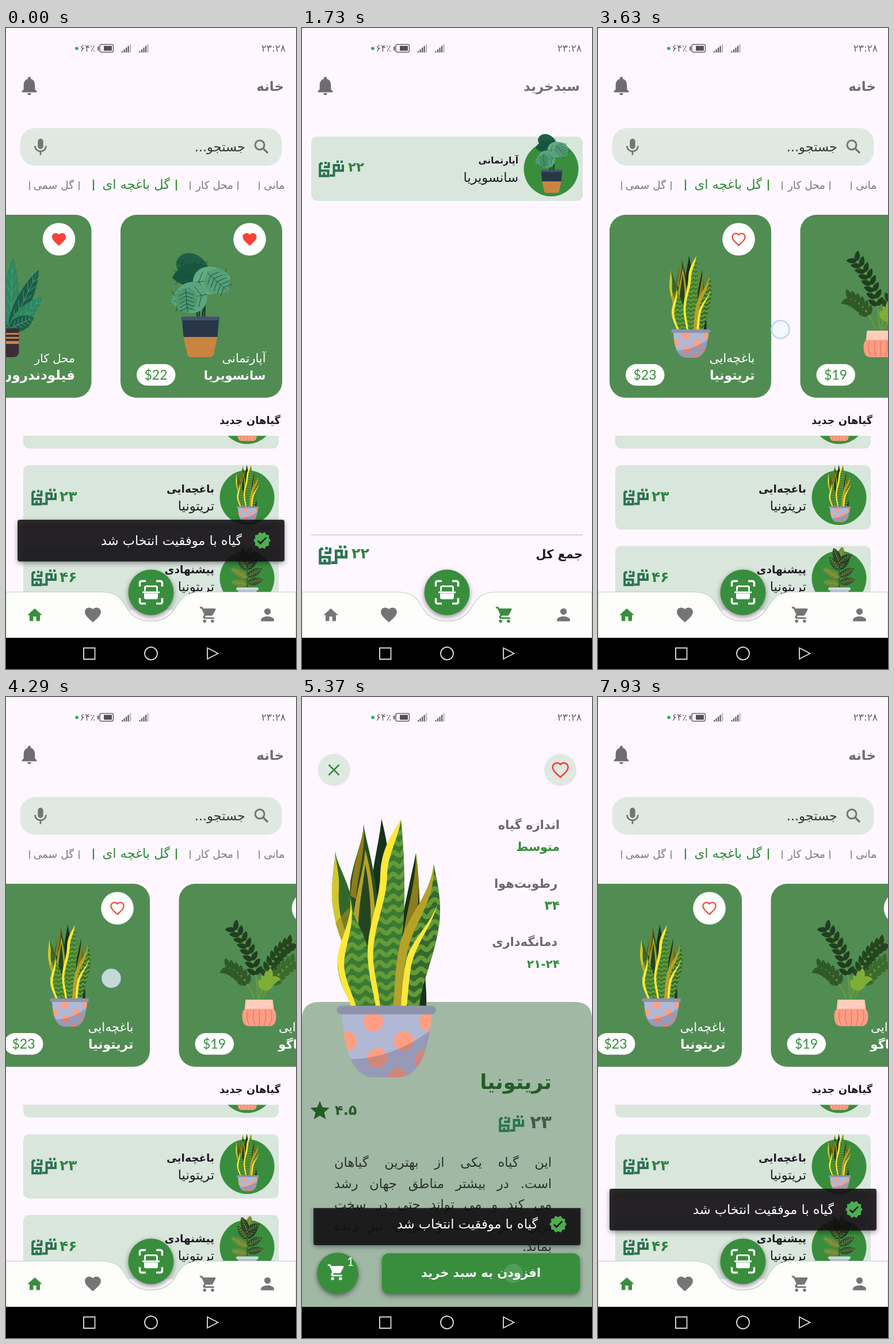
Recreate the animation shown at these times as an HTML page. Size 504 by 1112 pixels, loop 8000 ms.

```html
<!DOCTYPE html>
<html lang="fa">
<head>
<meta charset="utf-8">
<title>Plant shop</title>
<style>
  html, body { margin: 0; width: 100%; height: 100%; overflow: hidden; background: #fef7ff; }
  svg { display: block; }
  #stage { width: 504px; height: 1112px; }
  text, .para { font-family: "DejaVu Sans", "Noto Sans", sans-serif; }
  .latin { font-family: Lato, "Open Sans", sans-serif; }
  .soft { filter: drop-shadow(0 3px 4px rgba(0,0,0,.45)); }
  .para { direction: rtl; font-size: 22.5px; line-height: 36.6px; color: #2b322c; }
  .para div { text-align: justify; text-align-last: justify; white-space: nowrap; }
  .para div:last-child { text-align-last: right; }
</style>
</head>
<body>
<svg id="stage" viewBox="0 0 504 1112" xmlns="http://www.w3.org/2000/svg"></svg>
<script>
const LOOP = 8000;
const GREEN = '#388e3c', GREY = '#757575', RED = '#f44336', INK = '#1d1a22', BG = '#fef7ff';
const CARD_STEP = 331.5, REST = 764.5;
const GARDEN = 'باغچه&zwnj;ایی';

// ---------- drawing helpers ----------
const path = (d, fill, extra = '') => `<path d="${d}" fill="${fill}" ${extra}/>`;
const line = (d, color, w, extra = '') =>
  `<path d="${d}" fill="none" stroke="${color}" stroke-width="${w}" ${extra}/>`;
const rect = (x, y, w, h, r, fill, extra = '') =>
  `<rect x="${x}" y="${y}" width="${w}" height="${h}" rx="${r}" fill="${fill}" ${extra}/>`;
const disc = (x, y, r, fill, extra = '') => `<circle cx="${x}" cy="${y}" r="${r}" fill="${fill}" ${extra}/>`;
const at = (x, y, k, body) => `<g transform="translate(${x} ${y}) scale(${k})">${body}</g>`;

// Persian text hangs from its right edge, numbers from their left edge
const fa = (x, y, size, s, fill = INK, bold = false, anchor = 'start') =>
  `<text x="${x}" y="${y}" font-size="${size}" direction="rtl" text-anchor="${anchor}" fill="${fill}"
    font-weight="${bold ? 700 : 400}">${s}</text>`;
const num = (x, y, size, s, fill, bold = true, anchor = 'start') =>
  `<text x="${x}" y="${y}" font-size="${size}" direction="ltr" text-anchor="${anchor}" fill="${fill}"
    font-weight="${bold ? 700 : 400}">${s}</text>`;
const latin = (x, y, size, s, fill, extra = '') =>
  `<text class="latin" x="${x}" y="${y}" font-size="${size}" text-anchor="middle" fill="${fill}" ${extra}>${s}</text>`;

const HEART = 'M12 21.35l-1.45-1.32C5.4 15.36 2 12.28 2 8.5 2 5.42 4.42 3 7.5 3c1.74 0 3.41.81 4.5 2.09C13.09 3.81 14.76 3 16.5 3 19.58 3 22 5.42 22 8.5c0 3.78-3.4 6.86-8.55 11.54z';
const ICONS = {
  home: 'M10 20v-6h4v6h5v-8h3L12 3 2 12h3v8z',
  heart: HEART,
  cart: 'M5 20a2 2 0 1 0 4 0a2 2 0 1 0-4 0zM15 20a2 2 0 1 0 4 0a2 2 0 1 0-4 0zM1 2v2h2l3.6 7.6-1.4 2.4c-.7 1.4.3 3 1.8 3h12v-2H7.4l1-1.9h7.2c.8 0 1.4-.4 1.8-1l3.5-6.5c.4-.7-.1-1.6-.9-1.6H5.2L4.3 2z',
  person: 'M12 12a4 4 0 1 0 0-8a4 4 0 0 0 0 8zm0 2c-2.7 0-8 1.3-8 4v2h16v-2c0-2.7-5.3-4-8-4z',
  bell: 'M12 22a2 2 0 0 0 2-2h-4a2 2 0 0 0 2 2zm6-6v-5c0-3-1.6-5.6-4.5-6.3V4a1.5 1.5 0 0 0-3 0v.7C7.6 5.4 6 8 6 11v5l-2 2v1h16v-1z',
  star: 'M12 17.3L18.2 21l-1.7-7L22 9.2l-7.2-.6L12 2 9.2 8.6 2 9.2 7.5 14 5.8 21z',
  badge: 'M23 12l-2.4-2.8.3-3.7-3.6-.8-1.9-3.2L12 3 8.6 1.5 6.7 4.7l-3.6.8.3 3.7L1 12l2.4 2.8-.3 3.7 3.6.8 1.9 3.2L12 21l3.4 1.5 1.9-3.2 3.6-.8-.3-3.7zM10 17l-4-4 1.4-1.4 2.6 2.6 6.6-6.6L18 9z'
};
const icon = (name, x, y, size, fill, extra = '') =>
  at(x - size / 2, y - size / 2, size / 24, path(ICONS[name], fill, extra));
const openHeart = (x, y, size) =>
  at(x - size / 2, y - size / 2, size / 24,
    `<g transform="translate(.9 .9) scale(.925)">${line(HEART, RED, 2)}</g>`);

const toman = (x, y, k, color = '#2b7350') => at(x, y, k,
  line('M42 7V17.5H25M26.5 8H35V17.5M26.5 6V26H19M2.2 5V26.8H16.5V17.5H2M9.3 27V21M17.5 3V11H9M2 5H7', color, 4) +
  rect(31, 0, 4, 4, 0, color) + rect(38, 0, 4, 4, 0, color) + rect(10, 2, 4, 4, 0, color));

const leaf = (x, y, turn, len, w, fill, vein) => {
  const d = `M0 0C${len * .05} ${-w} ${len * .72} ${-w} ${len} 0C${len * .72} ${w} ${len * .05} ${w} 0 0Z`;
  let ribs = '';
  if (vein) {
    ribs = `M0 0H${len * .95}`;
    for (let u = .15; u < .8; u += .16)
      ribs += `M${len * u} 0l${len * .14} ${-w * .5}M${len * u} 0l${len * .14} ${w * .5}`;
  }
  return `<g transform="translate(${x} ${y}) rotate(${turn})">${path(d, fill)}${vein ? line(ribs, vein, .9) : ''}</g>`;
};

// ---------- plants ----------
function snakePlant() {
  const F = 'M172 212C160 245 140 270 136 310C134 350 118 390 114 440C114 480 126 510 130 536H160C166 500 166 470 172 430C180 380 180 290 172 212Z';
  const G = 'M83 347C90 380 66 420 62 455C60 490 78 515 86 536H130C124 500 114 470 114 440C112 410 86 385 83 347Z';
  const H = 'M229 291C222 350 180 380 170 440C164 480 162 510 160 536H204C208 490 240 430 240 370C240 340 234 315 229 291Z';
  const POT = 'M69 549H225Q222 597 210 625Q196 659 168 660H124Q98 659 84 628Q72 597 69 549Z';
  let bands = '';
  for (let y = 236; y < 560; y += 19) {
    bands += `M56 ${y + 14}`;
    for (let x = 56; x < 244; x += 24) bands += `q6 -9 12 -2t12 ${x % 16 ? -4 : 1}`;
  }
  const dots = [[124, 563], [78, 597], [177, 597], [131, 626], [221, 563], [213, 630], [166, 661]];
  return `<clipPath id="blades"><path d="${F}"/><path d="${G}"/><path d="${H}"/></clipPath>
    <clipPath id="pot"><path d="${POT}"/></clipPath><g id="snakeBig">` +
    path('M138 211C136 245 122 290 120 340V420H160C158 300 148 250 138 211Z', '#17331a') +
    path('M107 220C108 245 92 275 84 320L80 400H132C134 310 112 260 107 220Z', '#2a4d22') +
    path('M107 220C107 250 90 275 84 345L94 350C96 305 112 270 107 220Z', '#8c7d1a') +
    path('M58 268C56 300 48 335 55 370C58 395 66 415 72 432L92 400C92 330 62 300 58 268Z', '#33682c') +
    path('M58 268C57 300 47 335 55 370C58 395 66 415 72 432L78 412C68 390 62 365 64 335C66 310 60 295 58 268Z', '#d4c62c') +
    path('M58 392L82 365V410L72 432Z', '#a08f20', 'opacity=".6"') +
    path('M110 265C106 310 90 350 88 400L118 500C136 430 128 330 110 265Z', '#b5a229') +
    path('M110 290C106 330 96 370 98 420L116 455C124 395 118 330 110 290Z', '#24461f') +
    path('M198 271C188 320 176 370 168 420L156 536H216C218 470 200 420 204 360C205 330 200 300 198 271Z', '#17331a') +
    path('M198 271C198 330 180 370 172 440L186 420C204 380 207 330 198 271Z', '#8c7d1a') +
    path(F, '#3b7a34') + path(G, '#3b7a34') + path(H, '#34692f') +
    `<g clip-path="url(#blades)">${line(bands, '#649b38', 7.5, 'stroke-linecap="round"')}</g>` +
    path('M229 291C232 350 200 385 186 430C174 480 174 510 172 536H158C162 510 160 480 168 440C178 380 222 350 229 291Z', '#b5a229') +
    path('M236 358C226 398 198 425 189 470C185 500 184 520 182 536H172C174 500 177 470 184 447C197 415 224 392 236 358Z', '#fce83a') +
    path('M172 212C155 240 137 265 136 310C136 350 116 390 114 440C114 480 124 510 128 536H136C132 500 122 470 124 440C126 395 147 355 148 310C148 275 168 245 172 212Z', '#fce83a') +
    path('M83 347C90 385 64 420 62 455C61 490 78 515 85 536H94C82 500 70 480 74 452C78 420 94 390 83 347Z', '#fce83a') +
    `<g clip-path="url(#pot)">${path(POT, '#b1b8d3')}${dots.map(p => disc(p[0], p[1], 17, '#ff9e83')).join('')}` +
    path('M70 628C140 632 195 600 226 576V662H70Z', '#4d4266', 'opacity=".26"') + '</g>' +
    rect(60, 535.5, 173, 15, 7.5, '#8e93ac') + '</g>' +
    `<g id="snake" transform="translate(104 395) scale(.394) translate(-52 -211)"><use href="#snakeBig"/></g>`;
}

function broadPlant() {
  const vein = '#174c3a';
  return '<g id="broad" transform="translate(-199 0)">' +
    line('M336 502Q336 450 322 425M341 502Q346 465 352 440M333 502Q331 485 326 470M345 502Q348 440 340 420', '#1d3b30', 2.6) +
    leaf(296, 406, 12, 58, 27, '#1c6047', vein) + leaf(352, 424, 172, 64, 26, '#185640', vein) +
    leaf(325, 442, -8, 66, 32, '#61ad82', vein) + leaf(350, 425, 42, 48, 30, '#569f76', vein) +
    leaf(349, 462, 168, 63, 36, '#5aa57c', vein) +
    leaf(312, 452, 85, 42, 26, '#4d9870', vein) +
    rect(305, 500.5, 66, 7, 1, '#43546b') + path('M306 507H370L367.5 536H308.5Z', '#283748') +
    path('M308.5 536H367.5L361 566Q360 571 354 571H322Q316 571 315 566Z', '#c98442') + '</g>';
}

function featherPlant() {
  const fronds = [[-152, 92], [-128, 108], [-108, 118], [-88, 122], [-64, 112], [-44, 78], [-25, 45]];
  return '<g id="feather" transform="translate(133 0)">' +
    fronds.map((f, i) => leaf(7, 521, f[0], f[1], 17, i % 2 ? '#2f8560' : '#1b5c47', '#49a27b')).join('') +
    path('M-8 521H22V562Q21 571 12 571H2Q-7 571 -8 562Z', '#3a2d33') +
    rect(-8, 529, 30, 3, 0, '#c98442') + rect(-8, 536, 30, 3, 0, '#c98442') + rect(-8, 543, 30, 5, 0, '#c98442') + '</g>';
}

function sprigPlant() {
  // base, bend and tip of each stem, number of leaf pairs, colour
  const stems = [[438, 522, 438, 450, 399, 404, 8, '#1f3f20'], [432, 522, 415, 480, 388, 470, 6, '#2f5a28'],
    [441, 522, 455, 455, 492, 430, 8, '#24461f'], [446, 522, 470, 480, 497, 462, 6, '#3b6a2c'],
    [440, 524, 447, 500, 460, 488, 4, '#7fae35']];
  let s = '';
  for (const [x0, y0, x1, y1, x2, y2, n, c] of stems) {
    s += line(`M${x0} ${y0}Q${x1} ${y1} ${x2} ${y2}`, '#6f9c35', 2.4);
    for (let i = 1; i <= n; i++) {
      const u = .2 + .8 * i / n, v = 1 - u;
      const x = v * v * x0 + 2 * u * v * x1 + u * u * x2, y = v * v * y0 + 2 * u * v * y1 + u * u * y2;
      const dir = Math.atan2(v * (y1 - y0) + u * (y2 - y1), v * (x1 - x0) + u * (x2 - x1)) * 180 / Math.PI;
      s += leaf(x, y, dir - 48, 18, 6, c) + leaf(x, y, dir + 48, 18, 6, c);
    }
  }
  return `<g id="sprig" transform="translate(-301 0)">${s}` +
    path('M417 525H464L466 543H415Z', '#ffcdbb') +
    path('M417 541H464Q470 543 470 553Q470 571 458 571H423Q411 571 411 553Q411 543 417 541Z', '#fd9d86') +
    line('M421 543Q416 556 424 569M431 543Q428 556 433 570M441 543V570M451 543Q454 556 449 570M460 543Q466 556 458 569', '#e8765f', 1.4) + '</g>';
}

function rubberPlant() {
  const blades = [[140, 490, -28, 52], [140, 495, -150, 58], [140, 468, -52, 52], [140, 470, -128, 50],
    [140, 450, -80, 52], [140, 448, -112, 48], [142, 510, -12, 48], [138, 515, -170, 48], [140, 446, -30, 44]];
  return '<g id="rubber">' + line('M140 530V440', '#5f4a2e', 4) +
    blades.map((b, i) => leaf(...b, 15, ['#2e4a2b', '#6d8636', '#1f3a24'][i % 3], '#a3b04c')).join('') +
    rect(106, 524, 68, 9, 3, '#d3d6e2') + path('M111 533H169L160 571H120Z', '#bcc2d4') + '</g>';
}

const mini = (id, cx, top) =>
  `<g transform="translate(${cx} ${top}) scale(.565) translate(-140 -395)"><use href="#${id}"/></g>`;

// ---------- screens ----------
function card(i, plant, kind, name, price, liked, size) {
  return `<g transform="translate(${199 - CARD_STEP * i} 0)">` +
    rect(0, 324, 281, 317.5, 28, '#518c53') + disc(224.5, 366.5, 28.3, '#fff') +
    (liked ? icon('heart', 224.5, 366.5, 29, RED) : openHeart(224.5, 366.5, 29)) +
    `<use href="#${plant}" ${plant === 'snake' ? 'id="cardPlant"' : ''}/>` +
    rect(28, 583, 67.5, 37.5, 18.7, '#fff') + latin(61.5, 609.5, 23, price, GREEN) +
    fa(252.5, 580, size[0], kind, '#fff') + fa(252.5, 610, size[1], name, '#fff', true) + '</g>';
}

function row(y, plant, kind, name, price) {
  return rect(30, y, 444, 111.5, 10, '#d9e6dc') + disc(419, y + 56, 47.5, GREEN) +
    mini(plant, 419.5, y - 1) + fa(362, y + 47, 18.5, kind, INK, true) + fa(362, y + 78, 22.5, name) +
    num(93, y + 62, 25, price, '#2f8540') + toman(44, y + 41, 1);
}

const home = () =>
  fa(483, 109, 23, 'خانه', '#6f6b73', true) +
  rect(24.5, 173.5, 455, 65.5, 26, '#dfe9e1') +
  disc(441, 203, 8, 'none', `stroke="${GREY}" stroke-width="3"`) + line('M446.5 208.5L455 217', GREY, 3.4) +
  rect(55.3, 192, 9.4, 18, 4.7, GREY) + line('M50.5 204.5C50.5 217 69.5 217 69.5 204.5M60 214V220.5', GREY, 2.7) +
  fa(416, 214, 22.5, 'جستجو...', '#39353d') +
  `<svg x="0" y="250" width="483" height="50" viewBox="0 250 483 50">` +
  [440, 403, 320, 127, 41].map(x => line(`M${x} 266V281`, '#7b7680', 1.5)).join('') +
  line('M296 263V282M152 263V282', GREEN, 2.2) +
  fa(448, 279, 18.5, 'آپارتمانی', '#7b7680', false, 'end') + fa(395, 279, 18.5, 'محل کار', '#7b7680') +
  fa(285, 279, 22.5, 'گل باغچه ای', '#2e8b36') + fa(118, 279, 18.5, 'گل سمی', '#7b7680') + '</svg>' +
  '<g id="carousel">' +
  card(0, 'broad', 'آپارتمانی', 'سانسویریا', '$22', true, [21, 21]) +
  card(1, 'feather', 'محل کار', 'فیلودندرون', '$17', true, [20, 23]) +
  card(2, 'sprig', GARDEN, 'سینتاگو', '$19', false, [21.5, 21]) +
  card(3, 'snake', GARDEN, 'تریتونیا', '$23', false, [21.5, 22]) + '</g>' +
  fa(477, 687, 18, 'گیاهان جدید', INK, true) +
  `<svg x="0" y="707.5" width="504" height="350.5" viewBox="0 707.5 504 350.5">` +
  row(618, 'sprig', '', '', '') + '</svg>' +
  row(758.5, 'snake', GARDEN, 'تریتونیا', '۲۳') +
  row(898.5, 'rubber', 'پیشنهادی', 'تریتونیا', '۴۶');

const basket = () =>
  fa(483, 109, 23, 'سبدخرید', '#6f6b73', true) +
  rect(16, 188.5, 472, 111.5, 10, '#d9e6dc') + disc(433, 244.5, 47.5, GREEN) + mini('broad', 434.5, 186.5) +
  fa(376, 235, 15.5, 'آپارتمانی', INK, true) + fa(376, 267, 22.5, 'سانسویریا') +
  num(80, 249, 23, '۲۲', '#2f8540') + toman(29, 230, 1) +
  line('M16 879.5H488', '#b9bdc6', 1.2) + fa(488, 920, 21, 'جمع کل', INK, true) +
  num(86, 920, 25.5, '۲۲', '#2f8540') + toman(29, 898, 1.14);

const navBar = () =>
  path('M0 978.5H165C195 978.5 201 992 208 1003C218 1022 234 1029 252 1029C270 1029 286 1022 296 1003C303 992 309 978.5 339 978.5H504V1058H0Z', '#fdfefb', 'stroke="#b9d3b8" stroke-width="1.2"') +
  icon('home', 50, 1018.5, 31, GREY, 'id="tabHome"') + icon('heart', 151, 1018, 33.5, GREY) +
  icon('cart', 352, 1018, 33, GREY, 'id="tabCart"') + icon('person', 454.5, 1018, 34, GREY) +
  `<g class="soft">${disc(252, 979, 39.5, GREEN)}</g>` +
  line('M232.5 969V963Q232.5 959.5 236 959.5H243M261 959.5H268Q271.5 959.5 271.5 963V969M271.5 989V995Q271.5 998.5 268 998.5H261M243 998.5H236Q232.5 998.5 232.5 995V989', '#fff', 3.5) +
  line('M241.5 977V971Q241.5 968.5 244 968.5H260Q262.5 968.5 262.5 971V977M237 979H267', '#fff', 3) +
  path('M240 981H264V988Q264 991 261 991H243Q240 991 240 988Z', '#fff');

function detail() {
  const lines = ['این گیاه یکی از بهترین گیاهان', 'است. در بیشتر مناطق جهان رشد',
    'می کند و می تواند حتی در سخت', 'ترین شرایط آب و هوایی نیز زنده', 'بماند.'];
  const fact = (y, label, x) => fa(x, y, 21, label, '#6d6870', true);
  return rect(0, 0, 504, 1058, 0, BG) +
    path('M0 1058V559Q0 529 30 529H474Q504 529 504 559V1058Z', '#a1b9a4') +
    disc(55.5, 126.5, 28, '#dfe9e1') + line('M46.5 117.5l18 18m0 -18l-18 18', GREEN, 2.7) +
    disc(449, 126.5, 28, '#dfe9e1') + openHeart(449, 126.5, 35) +
    fact(229, 'اندازه گیاه', 448) + fa(448, 267, 20.5, 'متوسط', '#2f8f35', true) +
    fact(331, 'رطوبت&zwnj;هوا', 444) + num(448, 369, 22, '۳۴', '#2f8f35', true, 'end') +
    fact(432, 'دمانگه&zwnj;داری', 444) + num(448, 470, 20, '۲۱-۲۴', '#2f8f35', true, 'end') +
    fa(434, 680, 35, 'تریتونیا', '#245c28', true) +
    icon('star', 31, 717.5, 40, '#245c28') + num(57, 725, 24, '۴.۵', '#245c28') +
    num(434, 748, 31, '۲۳', '#48564a', true, 'end') + toman(342, 726, 1) +
    `<foreignObject x="56" y="789" width="378" height="190"><div xmlns="http://www.w3.org/1999/xhtml" class="para">` +
    lines.map(s => `<div>${s}</div>`).join('') + '</div></foreignObject>';
}

// stays above the snack bar's lower edge, below the plant
const buyBar = () =>
  `<g class="soft">${rect(139, 965, 344, 70.5, 12, GREEN)}${disc(62, 1000, 36, GREEN)}</g>` +
  fa(311, 1006, 21, 'افزودن به سبد خرید', '#fff', true, 'middle') +
  icon('cart', 60, 998, 33, '#fff') + latin(84, 987, 21, '0', '#fff', 'id="count"');

function status() {
  const bars = x => [0, 1, 2, 3, 4].map(i =>
    rect(x + i * 3.5, 40 - i * 3, 2.2, 2.5 + i * 3, 0, i > 3 ? '#b9b4bd' : '#5f5b64')).join('');
  return disc(123, 35.5, 2.8, '#1fae5a') + num(128.5, 41, 16.5, '۶۴٪', '#66626b', false) +
    rect(163, 28.5, 23.5, 13.5, 3, 'none', 'stroke="#66626b" stroke-width="1.5"') +
    rect(170, 31, 14, 8.5, 1, '#55515a') + rect(159, 32, 2.5, 7, 1, '#66626b') +
    bars(201) + bars(231.5) + num(486, 41, 17, '۲۳:۲۸', '#66626b', false, 'end');
}

const androidBar = () => rect(0, 1058, 504, 54, 0, '#000') +
  line('M135 1075.5H154.5V1095H135ZM350 1075.5V1094.5L368.5 1085Z', '#d8d8d8', 1.9) +
  disc(252, 1085, 11, 'none', 'stroke="#d8d8d8" stroke-width="1.9"');

const snack = () => `<g class="soft">${rect(20, 0, 464, 72.5, 4, 'rgb(17,15,18)', 'fill-opacity=".86"')}</g>` +
  fa(410, 43.5, 22.5, 'گیاه با موفقیت انتخاب شد', '#fff') + icon('badge', 445, 36, 33, '#4caf50');

document.getElementById('stage').innerHTML =
  `<defs>${snakePlant()}${broadPlant()}${featherPlant()}${sprigPlant()}${rubberPlant()}
    <clipPath id="reveal"><rect id="revealBox" x="0" y="0" width="504" height="110"/></clipPath></defs>` +
  rect(0, 0, 504, 1112, 0, BG) +
  `<g id="shell"><g id="home">${home()}</g><g id="basket">${basket()}</g>
    ${icon('bell', 40.5, 100, 39, '#6f6b73')}${navBar()}</g>
  <g id="detail">${detail()}${buyBar()}</g><g id="hero"><use href="#snakeBig"/></g>
  <g id="snack"><g clip-path="url(#reveal)">${snack()}</g></g>` + status() + androidBar() +
  disc(0, 0, 15.5, '#f3f8ff', 'id="touch" fill-opacity=".72" stroke="#bcd3ff" stroke-width="2.5"');

// ---------- motion ----------
const el = {};
document.querySelectorAll('#stage [id]').forEach(n => el[n.id] = n);
const set = (id, name, v) => el[id].setAttribute(name, v);
const show = (id, on) => el[id].style.display = on ? '' : 'none';
const clamp = v => Math.max(0, Math.min(1, v));
const span = (t, a, b) => clamp((t - a) / (b - a));
const mix = (a, b, p) => a + (b - a) * p;

function bezier(x1, y1, x2, y2) {
  const f = (s, a, b) => 3 * (1 - s) * (1 - s) * s * a + 3 * (1 - s) * s * s * b + s * s * s;
  return x => {
    let lo = 0, hi = 1;
    for (let i = 0; i < 24; i++) {
      const m = (lo + hi) / 2;
      if (f(m, x1, x2) < x) lo = m; else hi = m;
    }
    return f(lo, y1, y2);
  };
}
const standard = bezier(.4, 0, .2, 1), settle = bezier(.05, .7, .1, 1), smooth = bezier(.3, 0, .4, 1);

const SCROLL = [[3220, 0], [3420, 330], [3600, 815.5], [3640, 815.5], [3960, REST]];
const TOUCHES = [ // start, end, from, to
  [430, 640, 352, 1020, 352, 1020],
  [2640, 2820, 50, 1020, 50, 1020],
  [3220, 3440, 90, 523, 420, 523],
  [3540, 3990, 317, 523, 266, 523],
  [4200, 4480, 183, 488, 183, 488],
  [5040, 5390, 367, 1000, 367, 1000],
  [7020, 7590, 57, 138, 57, 138]
];
const OPEN = [4325, 4640], CLOSE = [7540, 7860];

function scrollAt(t) {
  let v = SCROLL[0][1];
  for (let i = 1; i < SCROLL.length; i++) {
    const [a, va] = SCROLL[i - 1], [b, vb] = SCROLL[i];
    if (t >= a) v = mix(va, vb, i === 4 ? smooth(span(t, a, b)) : span(t, a, b));
  }
  return v;
}

const zoom = k => `translate(252 529) scale(${k}) translate(-252 -529)`;

function render(t) {
  const inBasket = t >= 600 && t < 2780;
  const opening = span(t, ...OPEN), closing = span(t, ...CLOSE);
  const onDetail = opening > 0 && closing < 1;

  show('home', !inBasket);
  show('basket', inBasket);
  set('tabHome', 'fill', inBasket ? GREY : GREEN);
  set('tabCart', 'fill', inBasket ? GREEN : GREY);
  set('carousel', 'transform', `translate(${scrollAt(t)} 0)`);
  el.cardPlant.style.opacity = onDetail ? 0 : 1;

  const page = settle(opening), back = settle(closing);
  set('shell', 'transform', zoom(onDetail ? 1 + .05 * page * (1 - back) : 1));
  show('detail', onDetail);
  show('hero', onDetail);
  if (onDetail) {
    set('detail', 'transform', zoom((.85 + .15 * page) * (1 - .1 * back)));
    set('detail', 'opacity', span(opening, .08, .25) * (1 - span(closing, .08, .3)));
    const p = standard(opening) * (1 - standard(closing));
    const x = mix(110, 146.5, Math.sin(p * Math.PI / 2)), y = mix(483, 435.5, p);
    set('hero', 'transform', `translate(${x} ${y}) scale(${mix(.394, 1, p)}) translate(-146.5 -435.5)`);
    el.count.textContent = t < 5130 ? '0' : '1';
  }

  const rise = t < 4000 ? 1 - span(t, 1150, 1400) : standard(span(t, 5217, 5467));
  show('snack', rise > 0);
  set('snack', 'opacity', t < 4000 ? rise : clamp(rise * 2));
  set('snack', 'transform', `translate(0 ${t < 4000 ? 853 : mix(878.5, 853, standard(closing))})`);
  set('revealBox', 'y', rise < 1 ? 72 * (1 - rise) : -10);

  const tap = TOUCHES.find(c => t >= c[0] && t < c[1]);
  show('touch', tap);
  if (tap) {
    const u = span(t, tap[0], tap[1]);
    const slide = tap[0] === 3540 ? smooth(span(t, 3640, 3960)) : u;
    set('touch', 'transform', `translate(${mix(tap[2], tap[4], slide)} ${mix(tap[3], tap[5], slide)})`);
    set('touch', 'opacity', clamp((tap[1] - t) / 100));
  }
}

const start = performance.now();
function tick() {
  render((performance.now() - start) % LOOP);
  requestAnimationFrame(tick);
}
tick();
</script>
</body>
</html>
```
